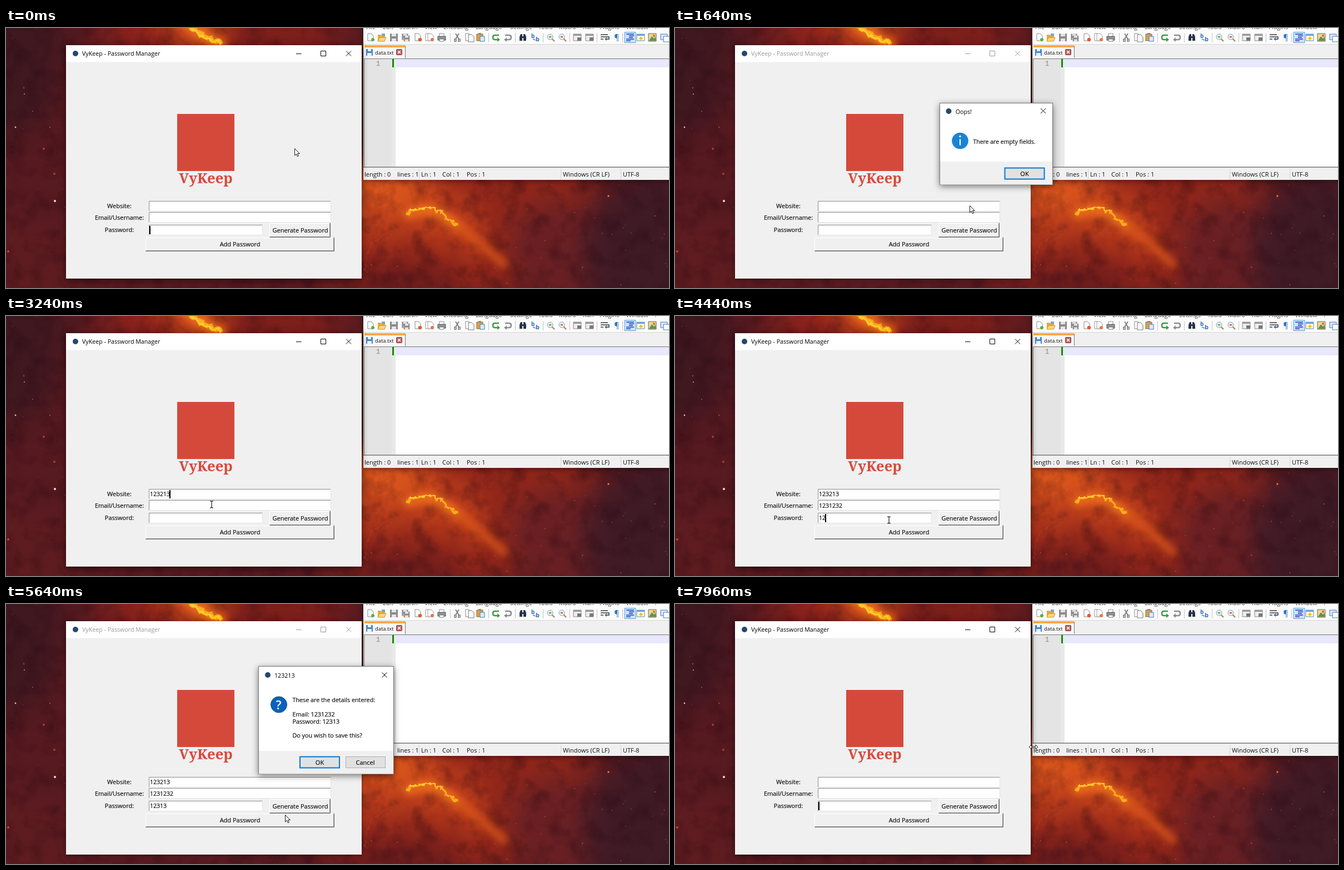
These frames come from a looping animation (1193 px wide and 469 px high, 8 s). An HTML page:

```html
<!DOCTYPE html>
<html lang="en">
<head>
<meta charset="utf-8">
<title>Password manager demo</title>
<style>
html, body { margin: 0; width: 100%; height: 100%; overflow: hidden; background: #4a1a21; }
svg { display: block; width: 100vw; height: 100vh; }
text { font-family: "Open Sans", "Noto Sans", sans-serif; font-size: 11px; fill: #111; white-space: pre; }
.mid { text-anchor: middle; }
.mid, .msg, .num { stroke: #111; stroke-width: .2px; }
.title { font-size: 10.65px; fill: #000; }
.msg { font-size: 10.75px; }
.num { font-size: 10.5px; }
.menu { font-size: 10.5px; fill: #444; }
.brand { font: 900 25.5px "Noto Serif", serif; fill: #d5493b; stroke: none; }
.line { fill: none; stroke: #000; stroke-width: 1; }
.idle .title { fill: #999; }
.idle .ctl { stroke: #999; }
.shade { filter: drop-shadow(0 3px 6px rgba(0,0,0,.5)); }
.idle .shade { filter: drop-shadow(0 1px 3px rgba(0,0,0,.4)); }
.dlg { will-change: opacity, transform; }
#oops { transform-origin: 516.8px 172px; }
#ask { transform-origin: 503px 161px; }
.ok { fill: #e1e1e1; stroke: #0078d7; stroke-width: 2; }
.hover .ok { fill: #e5f1fb; stroke-width: 1; }
</style>
</head>
<body>
<svg viewBox="0 0 1193 469">
  <defs>
    <filter id="cloud" filterUnits="userSpaceOnUse" x="-100" y="-100" width="1400" height="680" color-interpolation-filters="sRGB">
      <feGaussianBlur stdDeviation="24" result="b"/>
      <feTurbulence type="fractalNoise" baseFrequency=".022" numOctaves="4" seed="4"/>
      <feDisplacementMap in="b" scale="26" xChannelSelector="R" yChannelSelector="G"/>
    </filter>
    <filter id="wisp" filterUnits="userSpaceOnUse" x="200" y="-40" width="800" height="520" color-interpolation-filters="sRGB">
      <feGaussianBlur stdDeviation=".6" result="b"/>
      <feTurbulence type="fractalNoise" baseFrequency=".09" numOctaves="4" seed="8"/>
      <feDisplacementMap in="b" scale="13" xChannelSelector="R" yChannelSelector="G"/>
    </filter>
    <filter id="soft" filterUnits="userSpaceOnUse" x="200" y="-60" width="800" height="560"><feGaussianBlur stdDeviation="7"/></filter>
    <filter id="smoke" x="0" y="0" width="100%" height="100%" color-interpolation-filters="sRGB">
      <feTurbulence type="fractalNoise" baseFrequency=".03" numOctaves="5" seed="3"/>
      <feColorMatrix values="0 0 0 0 .15  0 0 0 0 .03  0 0 0 0 .07  2 0 0 0 -.85"/>
    </filter>
  </defs>

  <g id="sky">
    <rect width="1193" height="469" fill="#571a20"/>
    <g filter="url(#cloud)">
      <ellipse cx="10" cy="50" rx="90" ry="150" fill="#401820"/>
      <ellipse cx="40" cy="440" rx="130" ry="90" fill="#5e1c20"/>
      <ellipse cx="340" cy="0" rx="170" ry="50" fill="#94251a"/>
      <ellipse cx="345" cy="0" rx="60" ry="38" fill="#cf4a1b"/>
      <ellipse cx="500" cy="0" rx="110" ry="50" fill="#7e2019"/>
      <ellipse cx="800" cy="350" rx="270" ry="135" fill="#92261a"/>
      <ellipse cx="680" cy="315" rx="125" ry="70" fill="#b83c1b"/>
      <ellipse cx="675" cy="288" rx="85" ry="36" fill="#e0591c"/>
      <ellipse cx="800" cy="350" rx="80" ry="34" fill="#cc461b" transform="rotate(32 800 350)"/>
      <ellipse cx="690" cy="460" rx="130" ry="36" fill="#6e1d1c"/>
      <ellipse cx="1010" cy="400" rx="110" ry="95" fill="#6a2023"/>
      <ellipse cx="1170" cy="410" rx="130" ry="150" fill="#3f1b26"/>
      <ellipse cx="960" cy="285" rx="110" ry="34" fill="#8e261a"/>
    </g>
    <rect width="1193" height="469" filter="url(#smoke)" opacity=".4"/>
    <g filter="url(#soft)" fill="none" stroke-linecap="round">
      <path d="M322-10Q345 6 384 32" stroke="#ee6d1b" stroke-width="24"/>
      <path d="M725 335Q760 320 785 338T818 360" stroke="#ea6a1a" stroke-width="20"/>
      <path d="M815 358L850 386 895 425" stroke="#dc551b" stroke-width="15" opacity=".8"/>
    </g>
    <g filter="url(#wisp)" fill="none" stroke-linecap="round" stroke-linejoin="round">
      <path d="M326-8Q350 14 386 27" stroke="#fbaa1c" stroke-width="9"/>
      <path d="M335 0Q356 18 386 28" stroke="#ffd02c" stroke-width="3"/>
      <path d="M722 335Q740 320 765 326T790 342L812 356" stroke="#f9ad1e" stroke-width="4"/>
      <path d="M722 331Q748 322 766 325T782 337" stroke="#ffd62e" stroke-width="2"/>
      <path d="M648 440Q638 392 690 368T770 375" stroke="#c9431c" stroke-width="1.500" opacity=".5"/>
    </g>
    <g id="stars"></g>
  </g>

  <g id="editor">
    <rect x="643" y="-20" width="560" height="294" fill="#f0f0f0" style="filter:drop-shadow(0 2px 5px rgba(0,0,0,.45))"/>
    <rect x="643" width="550" height="29" fill="#fcfcfc"/>
    <g id="menu"></g>
    <g id="tools"></g>
    <path d="M643 29.500h550" stroke="#d8d8d8"/>
    <rect x="645" y="31" width="73" height="24" fill="#f7f7f7"/>
    <rect x="645" y="31" width="73" height="4" fill="#faaa3c"/>
    <path d="M718.500 32v22" stroke="#777"/>
    <g transform="translate(654 44)"><rect x="-6" y="-6" width="12" height="12" rx="1" fill="#3d86cf"/><path d="M-3-6h6v4h-6zM-4 1h8v5h-8z" fill="#e8f2fc"/></g>
    <text x="664" y="48" style="font-size:9.4px">data.txt</text>
    <rect x="702.500" y="38.500" width="10" height="10" rx="1" fill="#b85a5a" stroke="#8d4848"/>
    <path d="M705 41l5 5m0-5l-5 5" stroke="#fff" stroke-width="1.500"/>
    <rect x="645" y="55" width="548" height="195" fill="#fff"/>
    <rect x="645" y="55" width="49" height="195" fill="#e4e4e4"/>
    <rect x="694" y="55" width="7" height="195" fill="#e9e9e9"/>
    <rect x="701" y="56" width="492" height="15" fill="#e8e8ff"/>
    <rect x="695" y="56" width="3" height="15" fill="#0a8f0a"/>
    <text x="666" y="68" style="font:12px 'Liberation Mono',monospace;fill:#888">1</text>
    <path d="M644.500 251V55.500H1193" fill="none" stroke="#777"/>
    <path d="M643 251h550" stroke="#777" stroke-width="1.500"/>
    <path d="M743.500 254v19M998.500 254v19M1106.500 254v19" stroke="#d4d4d4"/>
    <g id="status"></g>
  </g>

  <g id="main">
    <rect class="shade" x="108" y="31" width="532" height="421" fill="#f0f0f0"/>
    <rect x="108" y="31" width="532" height="30.500" fill="#fff"/>
    <circle cx="125" cy="46" r="5" fill="#24486c"/>
    <text class="title" x="137" y="50">VyKeep - Password Manager</text>
    <path class="line ctl" d="M522 46.500h9.500M566.500 41.500h9v9h-9zM612 41.500l9 9m0-9l-9 9"/>
    <rect x="308" y="155" width="103" height="103" fill="#d5493b"/>
    <text class="brand mid" x="359.500" y="280">VyKeep</text>
    <text class="mid" x="204" y="325">Website:</text>
    <text class="mid" x="204" y="346">Email/Username:</text>
    <text class="mid" x="204" y="368">Password:</text>
    <g id="form"></g>
    <text class="mid" x="529.500" y="368.500">Generate Password</text>
    <text class="mid" x="421" y="394">Add Password</text>
    <text class="num" id="site" x="259" y="325"></text>
    <text class="num" id="mail" x="259" y="346"></text>
    <text class="num" id="pass" x="259" y="368"></text>
    <rect id="caret" width="2" height="15" fill="#000"/>
  </g>

  <g id="oops" class="dlg">
    <rect x="476.500" y="135.500" width="203" height="147" fill="#fff" stroke="#777" style="filter:drop-shadow(0 3px 6px rgba(0,0,0,.5))"/>
    <rect x="477" y="241" width="202" height="41.500" fill="#f0f0f0"/>
    <circle cx="492.500" cy="150" r="5" fill="#24486c"/>
    <text class="title" x="504.800" y="154.500">Oops!</text>
    <path class="line" d="M658 145l9 9m0-9l-9 9"/>
    <circle cx="513" cy="203.500" r="14.800" fill="#1a83d6"/>
    <path d="M513 200.500v11" stroke="#fff" stroke-width="2.200"/><circle cx="513" cy="195.500" r="1.700" fill="#fff"/>
    <text class="num" x="536.400" y="208.500">There are empty fields.</text>
    <rect class="ok" x="593.500" y="252.500" width="71" height="20"/>
    <text class="mid" x="629" y="266.500">OK</text>
  </g>

  <g id="ask" class="dlg">
    <rect x="454.500" y="112.500" width="243" height="194" fill="#fff" stroke="#777" style="filter:drop-shadow(0 3px 6px rgba(0,0,0,.5))"/>
    <rect x="455" y="265" width="242" height="41.500" fill="#f0f0f0"/>
    <circle cx="471" cy="128" r="5" fill="#24486c"/>
    <text class="title" x="483" y="132.500">123213</text>
    <path class="line" d="M676.500 123.500l9 9m0-9l-9 9"/>
    <circle cx="491" cy="181.500" r="14.500" fill="#0a62bd" stroke="#0b4c93"/>
    <text x="485.500" y="189.500" style="font-size:22px;font-weight:600;fill:#fff">?</text>
    <text class="msg" x="515.500" y="177">These are the details entered:</text>
    <text class="msg" x="515.500" y="202.500">Email: 1231232</text>
    <text class="msg" x="515.500" y="215.500">Password: 12313</text>
    <text class="msg" x="515.500" y="241">Do you wish to save this?</text>
    <rect class="ok" x="529" y="275.500" width="71" height="20"/>
    <text class="mid" x="564.500" y="290">OK</text>
    <rect x="611.500" y="275.500" width="71" height="20" fill="#e1e1e1" stroke="#adadad"/>
    <text class="mid" x="646.500" y="290">Cancel</text>
  </g>

  <g id="pointer">
    <path id="arrow" d="M.5.5v12.500l2.900-2.700 2 4.500 2-.9-2-4.400h3.900z" fill="#fff" stroke="#000" stroke-width=".9"/>
    <path id="beam" d="M-3-6h2l1 1 1-1h2M0-5V5M-3 6h2l1-1 1 1h2" fill="none" stroke="#000" stroke-width="1.100"/>
    <path id="resize" d="M-8 0l4-4v3h8v-3l4 4-4 4v-3h-8v3z" fill="#fff" stroke="#000" stroke-width=".9"/>
  </g>
</svg>
<script>
const $ = id => document.getElementById(id);
const fill = (id, parts) => { $(id).innerHTML = parts.join(''); };
const label = cls => ([x, y, s]) => `<text class="${cls}" x="${x}" y="${y}">${s}</text>`;

// Stars
let seed = 11;
const rnd = () => (seed = seed * 16807 % 2147483647) / 2147483647;
const star = (x, y, r, c) => `<circle cx="${x}" cy="${y}" r="${r}" fill="${c}"/>`;
const stars = [
  [17, 179, 1.4, '#ffb27a'], [33, 119, 1, '#e8947c'], [48, 150, .8, '#d88'], [79, 179, 1.2, '#c4402c'],
  [68, 218, 2, '#b5392a'], [87, 263, 2, '#b5392a'], [88, 312, 2, '#ffd9c4'], [4, 403, 2, '#c8402a'],
  [32, 108, .8, '#e8a08a'], [1084, 303, 1.6, '#f08a4a']
].map(s => star(...s));
for (let i = 0; i < 60; i++)
  stars.push(star(650 + rnd() * 540, 278 + rnd() * 190, .3 + rnd() * .5, rnd() < .4 ? '#e8866a' : '#b84c38'));
for (let i = 0; i < 25; i++) stars.push(star(rnd() * 106, rnd() * 469, .3 + rnd() * .4, '#98463a'));
fill('stars', stars);

// Editor chrome
fill('menu', [[648, 'File'], [678, 'Edit'], [708, 'Search'], [753, 'View'], [787, 'Encoding'], [845, 'Language'],
  [907, 'Settings'], [958, 'Tools'], [995, 'Macro'], [1038, 'Run'], [1068, 'Plugins'], [1116, 'Window'], [1167, '?']]
  .map(([x, s]) => label('menu')([x, 2, s])));
fill('status', [[645, 'length : 0'], [704, 'lines : 1'], [747, 'Ln : 1'], [785, 'Col : 1'], [829, 'Pos : 1'],
  [1002, 'Windows (CR LF)'], [1110, 'UTF-8']].map(([x, s]) => label('')([x, 268, s])));

const path = (d, f, s = 'none', w = 1) => `<path d="${d}" fill="${f}" stroke="${s}" stroke-width="${w}"/>`;
const page = (c = '#888', dx = 0) => path(`M${dx - 5}-7h6l4 4v9h-10z`, '#fff', c);
const disk = path('M-7-7h14v14h-14z', '#8b8b8b') + path('M-4-7h8v5h-8zM-4 2h8v5h-8z', '#e4e4e4');
const lens = c => path('M2 2l5 5', 'none', '#b08a50', 2.4) + `<circle cx="-1" cy="-1" r="5" fill="#e4f0f8" stroke="#8aa0b0"/>` + path('M-3-1h4', 'none', c, 2);
const turn = (c, k) => `<g transform="scale(${k} 1)">${path('M-5-4h7q4 0 4 4t-4 4h-5', 'none', c, 2.6)}${path('M-2 0v8l-5-4z', c)}</g>`;
const panes = path('M-7-6h14v12h-14z', '#eee', '#888') + path('M-7-6h14v3h-14z', '#999') + path('M0 0h7v6h-7z', '#777');
const icons = [
  [656, page() + star(4, 4, 3, '#58b045')],
  [676, path('M-7 6v-11h5l2 2h6v9z', '#e8a93a') + path('M-7 7l3-7h12l-3 7z', '#ffd677', '#c98f2c') + path('M0-7h6v4h-6z', '#6aa5dc')],
  [698, disk],
  [719, `<g transform="translate(-1 -1) scale(.8)">${disk}</g><g transform="translate(2 2) scale(.75)">${disk}</g>`],
  [741, page() + star(4, 4, 3.3, '#e05a34')],
  [762, page('#999', -2) + page('#999', 2) + star(5, 4, 3, '#e07a4a')],
  [784, path('M-4-7h8v6h-8z', '#fff', '#888') + path('M-7-2h14v7h-14z', '#8d939c', '#555') + path('M-4 3h8v4h-8z', '#fff', '#777')],
  [812, path('M-3-7L3 3M3-7L-3 3', 'none', '#777', 1.6) + path('M-5 3h3v4h-3zM2 3h3v4h-3z', 'none', '#777', 1.5)],
  [834, page('#888', -2) + `<g transform="translate(3 2)">${page('#777')}</g>`],
  [854, path('M-7-6h11v12h-11z', '#d9a24e', '#8a6428') + path('M-4-8h5v3h-5z', '#888') + path('M-1-2h8v9h-8z', '#dcebfb', '#3f78c0')],
  [882, turn('#3f9a45', -1)], [903, turn('#8d8d8d', 1)],
  [930, path('M-6 6v-7l2-5h3v4h2v-4h3l2 5v7h-5v-5h-2v5z', '#27344d')],
  [952, '<text x="-7" y="1" style="font-size:10px;font-weight:700;fill:#2b6cc4">b</text><text x="1" y="7" style="font-size:11px;font-weight:700;fill:#2b6cc4">b</text>' + path('M-4 3l5 2', 'none', '#333')],
  [980, lens('#3f9a45')], [1001, lens('#d0482e')], [1028, panes], [1050, panes],
  [1078, path('M-8-5h13M-8-1h15v4h-6M-8 3h5', 'none', '#333', 1.4) + path('M3 0v6l-4-3z', '#2b6cc4')],
  [1099, '<text x="-4.500" y="5" style="font-size:14px;fill:#2b6cc4">¶</text>'],
  [1123, path('M-10-9.500h20v19h-20z', '#cce4f7', '#56a0dc') + path('M-7-6h14M-2-3h9M-2 0h7M-7 3h14M-7 6h8', 'none', '#1d35c8', 1.6)],
  [1142, path('M-7-6h14v12h-14z', '#fffbe0', '#5d8fc0') + path('M-7-6h14v3h-14z', '#6aa5dc') + path('M2-3l-6 6h4l-2 4 7-6h-4z', '#f2b52a')],
  [1163, path('M-7-7h14v14h-14z', '#f2d98a', '#666') + path('M-6 6l5-8 4 4 3-3v7z', '#5c9448') + star(3, -3, 2, '#d0612e')],
  [1186, path('M-8-6h12v10h-12z', '#dcebfb', '#3f78c0') + path('M-3-2h13v10h-13z', '#fff', '#3f78c0')]
];
fill('tools', icons.map(([x, s]) => `<g transform="translate(${x} 17)">${s}</g>`).concat(
  [799, 868, 916, 966, 1014, 1063, 1109].map(x => path(`M${x}.5 9v17`, 'none', '#c4c4c4'))));

// Form widgets
const entry = (x, y, w, h) => path(`M${x} ${y}h${w}v${h}h-${w}z`, '#fff') +
  path(`M${x + .5} ${y + h}v-${h - .5}h${w - .5}`, 'none', '#8c8c8c') +
  path(`M${x} ${y + h - .5}h${w - .5}v-${h}`, 'none', '#e3e3e3');
const button = (x, y, w, h) => path(`M${x} ${y}h${w}v${h}h-${w}z`, '#f0f0f0') +
  path(`M${x + .5} ${y + h}v-${h - .5}h${w}`, 'none', '#fff') +
  path(`M${x + 1} ${y + h - 1.5}h${w - 2.5}v-${h - 2}`, 'none', '#a0a0a0') +
  path(`M${x} ${y + h - .5}h${w - .5}v-${h}`, 'none', '#696969');
fill('form', [entry(257, 312, 328, 19), entry(257, 332, 328, 19), entry(257, 355, 205, 19),
  button(474, 352, 110, 26), button(251, 378, 340, 25)]);

// Timeline
const LOOP = 8000;
const track = (keys, t) => {
  let i = keys.findIndex(k => k[0] > t);
  if (i < 0) i = keys.length;
  const a = keys[Math.max(i - 1, 0)], b = keys[Math.min(i, keys.length - 1)];
  const p = b[0] > a[0] ? (t - a[0]) / (b[0] - a[0]) : 0;
  return a.slice(1).map((v, j) => v + (b[j + 1] - v) * p);
};
const moves = [
  [0, 519, 217], [40, 519, 217], [80, 516, 216], [280, 516, 216], [640, 462, 330], [840, 434, 384], [920, 432, 387],
  [1320, 432, 387], [1640, 530, 320], [1840, 603, 269], [1920, 607, 267], [2000, 607, 267], [2120, 602, 276],
  [2400, 460, 312], [2600, 376, 322], [2720, 366, 320], [3080, 366, 322], [3240, 370, 340], [3360, 370, 340],
  [3440, 374, 346], [4040, 374, 346], [4240, 392, 371], [4320, 385, 368], [4680, 385, 368], [4960, 404, 396],
  [5280, 404, 396], [5480, 462, 396], [5640, 502, 380], [5800, 513, 328], [5920, 515, 301], [6320, 515, 301],
  [6640, 525, 227], [6880, 545, 258], [7040, 557, 288], [7120, 557, 291], [7840, 557, 290], [7920, 602, 273], [7960, 645, 258]
];
const fade = (open, close) => [
  [open, 0, .95], [open + 80, .15, .96], [open + 160, .6, .98], [open + 240, .95, .997], [open + 280, 1, 1],
  [close - 40, 1, 1], [close, .85, .992], [close + 120, .43, .98], [close + 200, 0, .965]
];
const fades = { oops: fade(1120, 2000), ask: fade(5120, 7440) };
const CLEAR = 7440;
const fields = [
  { id: 'site', text: '123213', focus: 2720, y: 314, at: [2840, 2920, 2960, 3040, 3120, 3200] },
  { id: 'mail', text: '1231232', focus: 3400, y: 334, at: [3640, 3680, 3760, 3800, 3880, 3960, 4000] },
  { id: 'pass', text: '12313', focus: 4280, y: 357, at: [4360, 4440, 4520, 4600, 4680] }
];
const show = (id, on) => $(id).setAttribute('visibility', on ? 'visible' : 'hidden');

function draw(t) {
  t = Math.floor(t / 40) * 40;
  const [x, y] = track(moves, t);
  const idle = (t >= 1120 && t < 2000) || (t >= 5120 && t < 7440);
  $('main').classList.toggle('idle', idle);

  for (const id in fades) {
    const [alpha, scale] = track(fades[id], t);
    $(id).style.opacity = alpha;
    $(id).style.transform = `scale(${scale})`;
    show(id, alpha > 0);
  }
  $('oops').classList.toggle('hover', x > 593 && x < 665 && y > 252 && y < 277);
  $('ask').classList.toggle('hover', x > 528 && x < 600 && y > 275 && y < 296);

  let active = fields[2], typed = 0;
  for (const f of fields) {
    const n = t < CLEAR ? f.at.filter(a => a <= t).length : 0;
    $(f.id).textContent = f.text.slice(0, n);
    if (t >= f.focus && t < CLEAR) { active = f; typed = n; }
  }
  const blinkOff = (t >= 520 && t < 800) || (t >= 2400 && t < 2680);
  $('caret').setAttribute('x', 258 + typed * 6);
  $('caret').setAttribute('y', active.y);
  show('caret', !idle && !blinkOff);

  const beam = t >= 2560 && t < 4760, resize = t >= 7960;
  $('pointer').setAttribute('transform', `translate(${Math.round(x)} ${Math.round(y)})`);
  show('beam', beam);
  show('resize', resize);
  show('arrow', !beam && !resize);
}

const start = performance.now();
function tick() {
  draw((performance.now() - start) % LOOP);
  requestAnimationFrame(tick);
}
tick();
</script>
</body>
</html>
```
